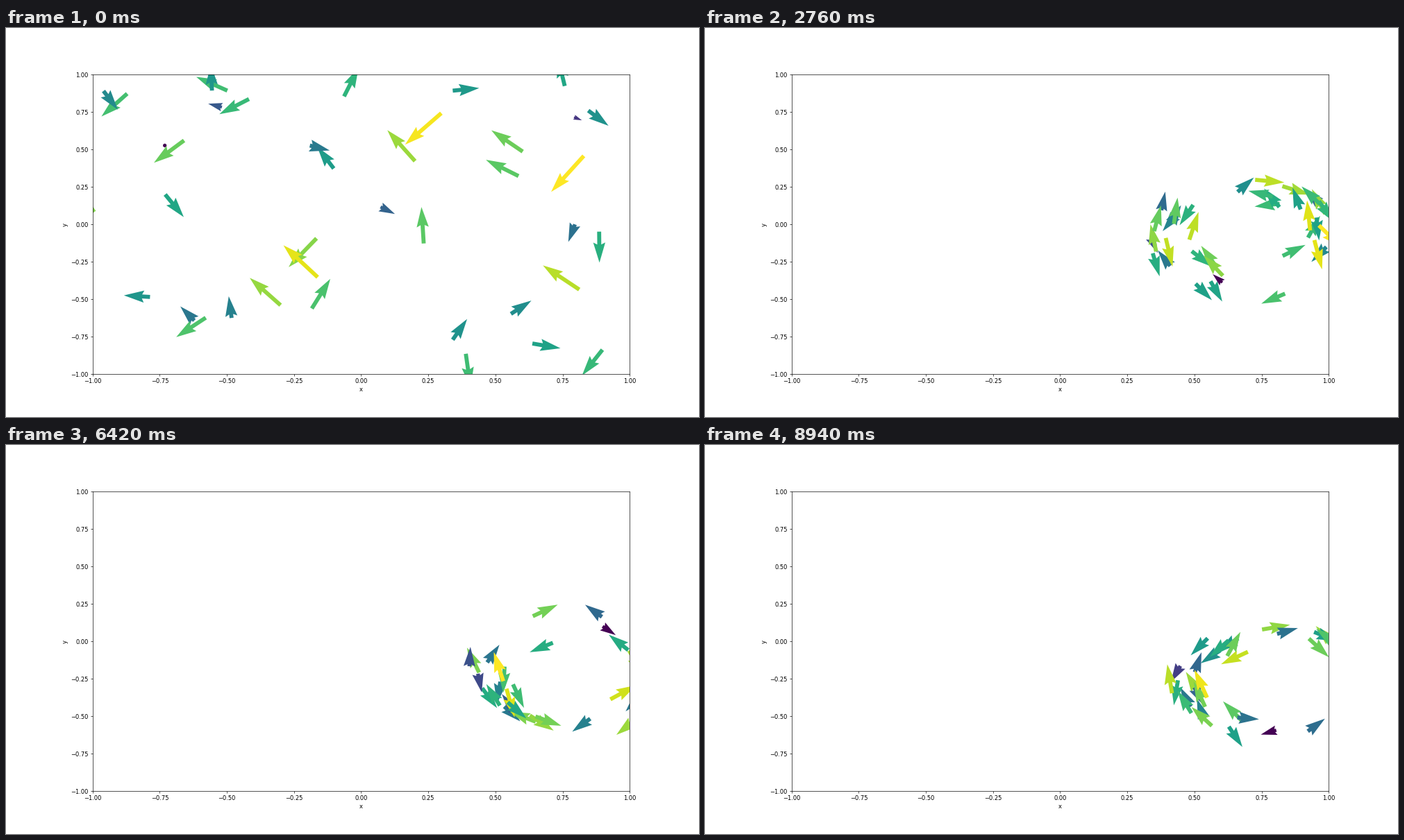
Write a matplotlib script that moves like this. It is 998 px wide and 561 px high and loops after 9000 ms.

```python
import numpy as np
import matplotlib.pyplot as plt
from matplotlib.animation import FuncAnimation

COUNT, FRAMES, INTERVAL = 40, 150, 60
OMEGA = 0.36        # orbit rate, radians per frame
TRAVEL = 0.0033     # axis units per frame for one dot of arrow length
SETTLE = 6.0        # damping time of the scattered start, in frames
ROUNDING = 25.0     # time over which flat orbits open into a ring

rng = np.random.default_rng(12)
start = rng.uniform(-1, 1, (COUNT, 2))
start_v = rng.uniform(-53, 53, (COUNT, 2))
reach = rng.normal(0.37, 0.025, COUNT)
flatness = rng.uniform(0.05, 0.8, COUNT)
tilt = rng.uniform(0, 2 * np.pi, COUNT)
rate = OMEGA * rng.normal(1, 0.015, COUNT)
phase = np.arange(COUNT) * np.pi * (3 - np.sqrt(5))
spin = np.where(np.arange(COUNT) % 2, 1, -1)


def centre(t):
    return np.array([0.8 - 0.895 * np.exp(-t / 21),
                     -0.0019 * t + 0.02 * np.sin(t / 8)])


def orbit(t):
    """Elliptic orbits in both senses around the moving centre."""
    flat = flatness * (0.5 + 0.5 * np.exp(-max(t - 19, 0) / ROUNDING))
    angle = phase + rate * t
    a = reach * np.cos(angle)
    b = reach * (1 - flat) * spin * np.sin(angle)
    offset = np.column_stack([a * np.cos(tilt) - b * np.sin(tilt),
                              a * np.sin(tilt) + b * np.cos(tilt)])
    return centre(t) + offset


def slope(path, t, h=1e-3):
    return (path(t + h) - path(t - h)) / (2 * h)


# a damped spring carries each particle from its start onto its orbit
gap = start - orbit(0)
gap_v = start_v * TRAVEL - slope(orbit, 0) + gap / SETTLE


def place(t):
    swing = gap * np.cos(OMEGA * t) + gap_v * np.sin(OMEGA * t) / OMEGA
    return orbit(t) + np.exp(-t / SETTLE) * swing


def state(t):
    v = slope(place, t) / TRAVEL
    return place(t), v, np.hypot(v[:, 0], v[:, 1])


fig, ax = plt.subplots(figsize=(998 / 60, 561 / 60), dpi=60)
ax.set(xlim=(-1, 1), ylim=(-1, 1), xlabel="x", ylabel="y")
pos, vel, speed = state(0)
arrows = ax.quiver(pos[:, 0], pos[:, 1], vel[:, 0], vel[:, 1], speed,
                   cmap="viridis", angles="uv", scale=1,
                   scale_units="dots", width=0.0075)


def draw(i):
    p, v, speed = state(i)
    arrows.set_offsets(p)
    arrows.set_UVC(v[:, 0], v[:, 1], speed)
    arrows.set_clim(speed.min(), speed.max())
    return arrows,


anim = FuncAnimation(fig, draw, frames=FRAMES, interval=INTERVAL,
                     repeat=True, repeat_delay=0)
plt.show()
```
